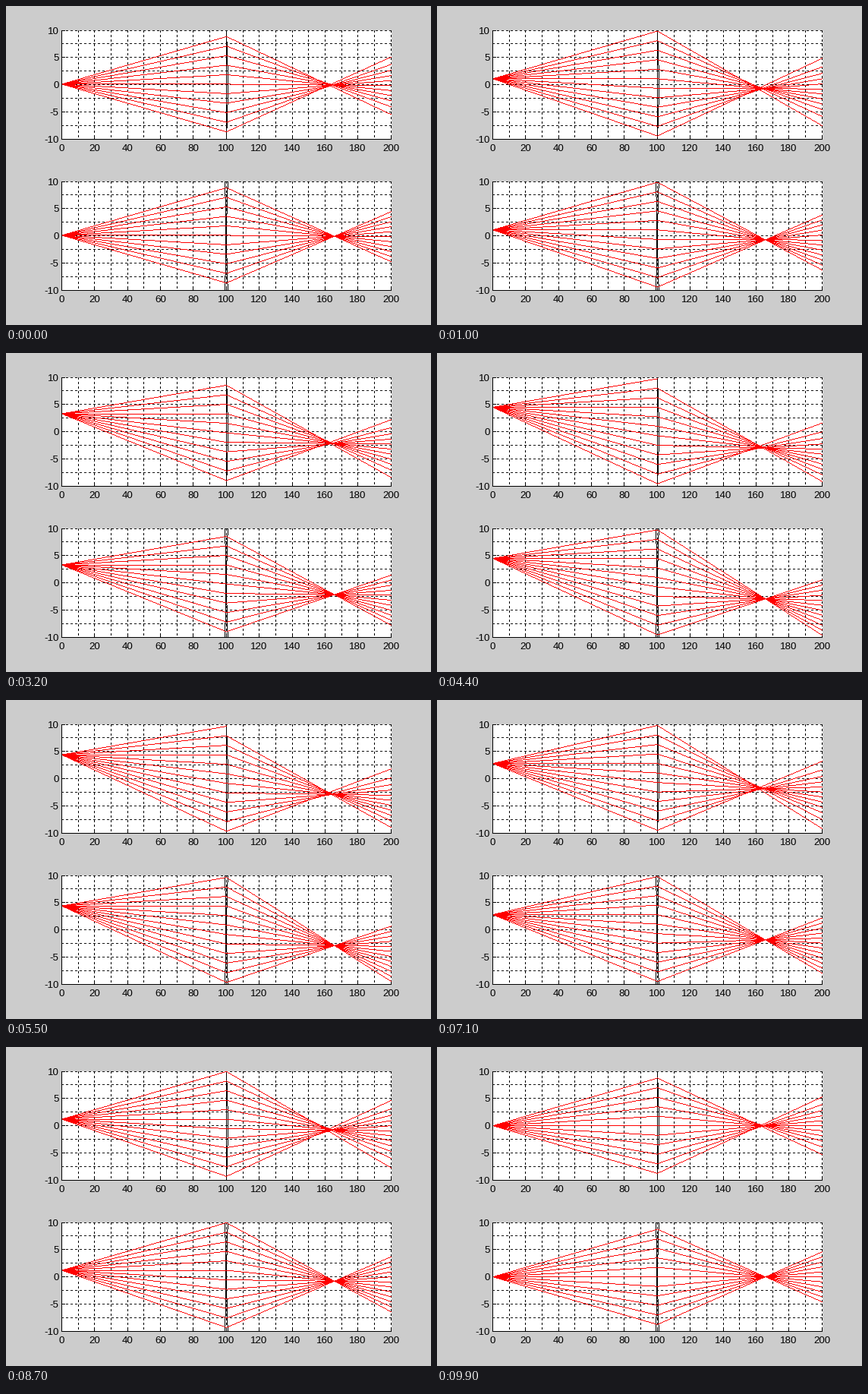
A matplotlib script for the animation above (10000 ms loop, 560x420 px).

```python
import numpy as np
import matplotlib.pyplot as plt
from matplotlib.animation import FuncAnimation
from matplotlib.collections import LineCollection

W, H, DPI = 560, 420, 100
PX = 72 / DPI                     # one pixel in points
LEFT, WIDTH, HEIGHT = 72.8, 434, 143.3
FRAMES, INTERVAL = 100, 100

LENS_X, END_X, LIMIT = 100, 200, 10
FOCUS = 39.6
ABERRATION = 1.35e-7              # fifth-order term of the spherical lens
SLOPES = np.tan(np.radians(np.arange(-12, 13)))

plt.rcParams["font.family"] = "Liberation Sans"
fig = plt.figure(figsize=(W / DPI, H / DPI), dpi=DPI, facecolor="#cccccc")
stage = fig.add_axes([0, 0, 1, 1])
stage.set(xlim=(0, W), ylim=(H, 0))
stage.axis("off")


def pixel(v):
    return np.floor(np.asarray(v) + 0.5).astype(int)


def col(x):
    return pixel(LEFT + np.asarray(x) * WIDTH / END_X)


def row(top, y):
    return pixel(top + (LIMIT - np.asarray(y)) * HEIGHT / 20)


def runs(along, across):
    """Merge consecutive equal pixels into (start, end, centre) strips."""
    cuts = np.flatnonzero(np.diff(across)) + 1
    starts = np.r_[0, cuts]
    ends = np.r_[cuts, len(across)]
    return [(along[0] + a, along[0] + b, across[a] + 0.5)
            for a, b in zip(starts, ends)]


def ray_line(top, x0, y0, x1, y1):
    """Jagged one-pixel line, without smoothing."""
    cols = np.arange(col(x0), col(x1) + 1)
    ys = np.interp(cols, [cols[0], cols[-1]], [y0, y1])
    return [((a, c), (b, c)) for a, b, c in runs(cols, row(top, ys))]


def stroke(xs, ys, **kw):
    stage.plot(xs, ys, color="black", lw=PX, snap=False,
               solid_capstyle="butt", **kw)


def hline(x0, x1, y, **kw):
    stroke([x0, x1], [y + 0.5, y + 0.5], **kw)


def vline(x, y0, y1, **kw):
    stroke([x + 0.5, x + 0.5], [y0, y1], **kw)


def label(x, y, value, ha):
    stage.text(x, y, str(value), ha=ha, va="baseline", fontsize=13.33 * PX)


def make_panel(top, surfaces):
    x0, x1 = col(0), col(END_X)
    y0, y1 = row(top, LIMIT), row(top, -LIMIT)
    stage.add_patch(plt.Rectangle((x0, y0), x1 - x0 + 1, y1 - y0 + 1,
                                  fc="white", ec="none", zorder=0))
    dash = dict(dashes=(3, 3), zorder=1)
    for x in range(0, 201, 10):
        vline(col(x), y0, y1 + 1, **dash)
    for y in np.arange(-10, 10.1, 2.5):
        hline(x0, x1 + 1, row(top, y), **dash)
    vline(x0, y0, y1 + 1, zorder=4)
    hline(x0, x1 + 1, y1, zorder=4)

    for x in range(0, 201, 20):
        vline(col(x), y1 - 4, y1, zorder=1)
        label(col(x) + 0.5, y1 + 16, value=x, ha="center")
    for y in range(-10, 11, 5):
        hline(x0, x0 + 5, row(top, y), zorder=1)
        label(69.5, row(top, y) + 5, value=y, ha="right")

    rows = np.arange(y0, y1 + 1)
    bend = np.linspace(-1, 1, len(rows)) ** 2
    for surface in surfaces:
        for a, b, c in runs(rows, col(LENS_X + surface(bend))):
            stroke([c, c], [a, b], zorder=2)

    rays = LineCollection([], colors="red", linewidths=PX, capstyle="butt", zorder=3)
    rays.set_snap(False)
    stage.add_collection(rays, autolim=False)
    return rays


TOPS = (31.52, 230.52)
PANELS = [
    (TOPS[0], ABERRATION, make_panel(TOPS[0], [
        lambda q: 0 * q,
        lambda q: 0.9 * (1 - q)])),
    (TOPS[1], 0, make_panel(TOPS[1], [
        lambda q: -0.2 - 0.75 * q,
        lambda q: 0.2 + 0.75 * q])),
]


def trace(top, source, aberration):
    lines = []
    for slope in SLOPES:
        h = source + slope * LENS_X
        if abs(h) >= LIMIT:
            continue
        lines += ray_line(top, 0, source, LENS_X, h)
        bent = slope - h / FOCUS - aberration * h ** 5
        end = h + bent * (END_X - LENS_X)
        if abs(end) < LIMIT:
            lines += ray_line(top, LENS_X, h, END_X, end)
    return lines


def update(i):
    source = min(i + 1, 99 - i) / 10
    for top, aberration, rays in PANELS:
        rays.set_segments(trace(top, source, aberration))
    return [panel[-1] for panel in PANELS]


anim = FuncAnimation(fig, update, frames=FRAMES, interval=INTERVAL,
                     repeat=True, repeat_delay=0, blit=False)
plt.show()
```
